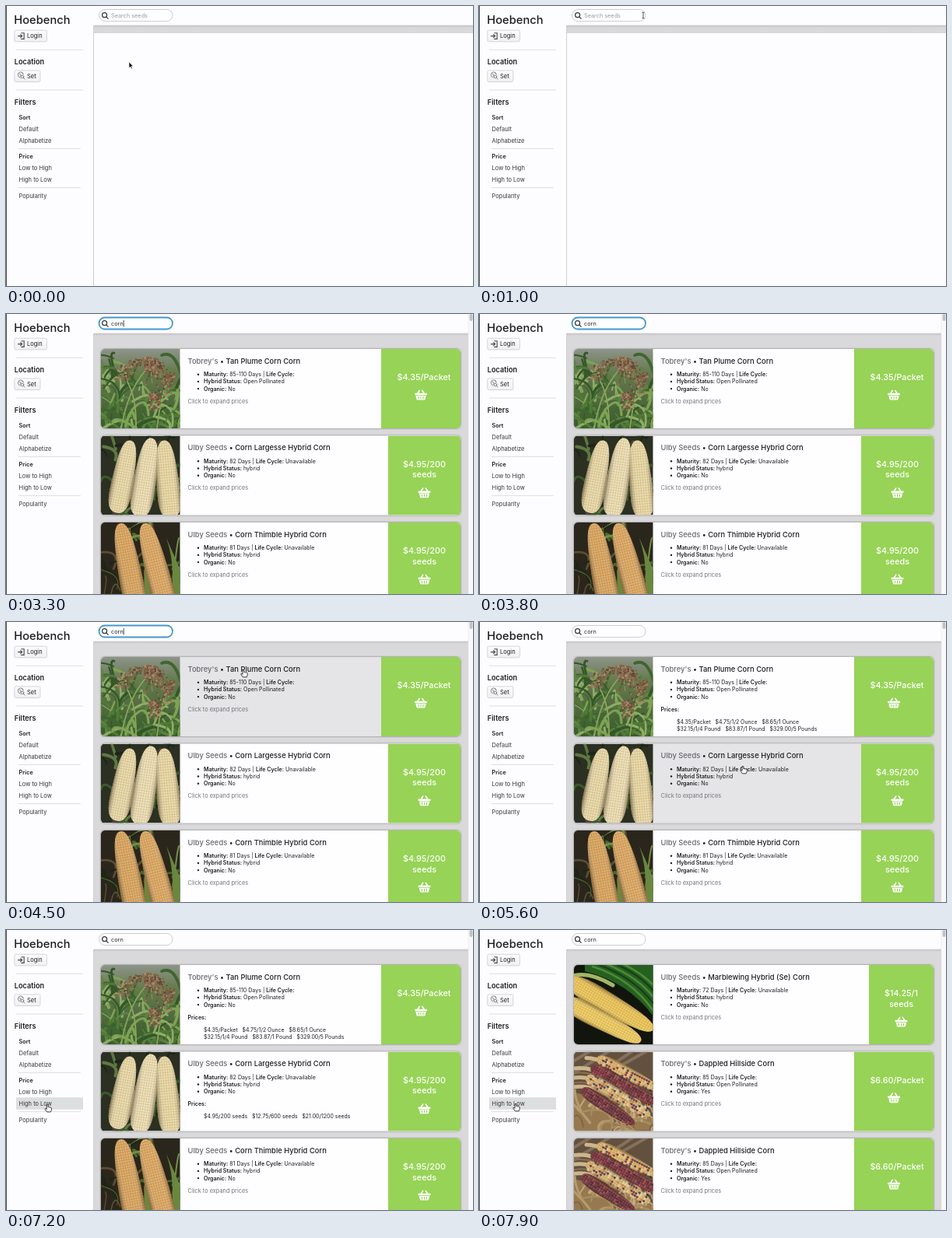
An HTML page for the animation above (8000 ms loop, 600 by 360 pixels).

```html
<!DOCTYPE html>
<html lang="en">
<head>
<meta charset="utf-8">
<title>Seed search</title>
<style>
html, body { margin: 0; width: 100%; height: 100%; overflow: hidden; background: #fdfcfe; }
svg { display: block; }
text { font-family: Inter, "Open Sans", sans-serif; fill: #1d1d20; white-space: pre; }
.b { font-weight: 600; }
.m { font-weight: 500; }
</style>
</head>
<body>
<svg id="stage" width="600" height="360" viewBox="0 0 600 360">
  <defs>
    <clipPath id="cardClip"><rect width="462" height="102" rx="5"/></clipPath>
    <pattern id="kernels" width="3.4" height="3.1" patternUnits="userSpaceOnUse">
      <path d="M0 0H3.4M0 0V3.1" stroke="#6b4310" stroke-opacity=".3" stroke-width=".8"/>
      <circle cx="1.9" cy="1.7" r=".8" fill="#fff" fill-opacity=".25"/>
    </pattern>
    <linearGradient id="round" x2="0" y2="1">
      <stop offset="0" stop-color="#2a1800" stop-opacity=".45"/>
      <stop offset=".25" stop-color="#fff" stop-opacity=".1"/>
      <stop offset=".7" stop-color="#fff" stop-opacity=".08"/>
      <stop offset="1" stop-color="#2a1800" stop-opacity=".5"/>
    </linearGradient>
    <linearGradient id="button" x2="0" y2="1">
      <stop offset="0" stop-color="#fdfcfe"/><stop offset="1" stop-color="#f0f0f2"/>
    </linearGradient>
    <linearGradient id="shade" x2="0" y2="1">
      <stop offset="0" stop-color="#000" stop-opacity=".1"/><stop offset="1" stop-color="#000" stop-opacity="0"/>
    </linearGradient>
    <linearGradient id="field" x2="0" y2="1">
      <stop offset="0" stop-color="#8d9488"/><stop offset=".3" stop-color="#66794f"/><stop offset="1" stop-color="#3a5a2c"/>
    </linearGradient>
  </defs>
  <rect width="600" height="360" fill="#fdfcfe"/>
  <rect id="bar" x="112" y="25" width="488" height="10" fill="#d9d8da"/>
  <g id="results"></g>
  <rect x="113" y="25" width="487" height="3" fill="url(#shade)"/>
  <path d="M113 25H600" stroke="#cccbce" stroke-width=".7"/>
  <g id="scroll">
    <rect x="594" width="6" height="360" fill="#f9f8fa"/>
    <path d="M594 0V360" stroke="#e6e5e7" stroke-width=".6"/>
    <rect x="595.5" y="0" width="4" height="9" rx="2" fill="#c2c1c3"/>
  </g>
  <g id="sidebar"></g>
  <g id="search">
    <rect id="box" x="119.5" y="4.5" width="94.5" height="15" rx="7.5" fill="#fefdff"/>
    <g fill="none" stroke="#34343a" stroke-width="1.2" stroke-linecap="round">
      <circle cx="126.6" cy="11.7" r="3"/><path d="M129 14.1l2.2 2.2"/>
    </g>
    <text id="query" x="135" y="14.8" font-size="7.3"></text>
    <path id="caret" stroke="#222" stroke-width=".8"/>
  </g>
  <g id="pointer">
    <path id="arrow" d="M0 0V7.6L1.8 6L3 8.7L4.2 8.2L3 5.5H5.4Z" fill="#111" stroke="#fff" stroke-width=".5"/>
    <path id="beam" d="M-1.5 -4Q0 -4 0 -3V3Q0 4 -1.5 4M1.5 -4Q0 -4 0 -3M0 3Q0 4 1.5 4" fill="none" stroke="#222" stroke-width=".8"/>
    <path id="hand" d="M-.9 .8Q0 -.6 .9 .8V3.6Q1.9 3 2.5 3.9Q3.4 3.4 4 4.3Q5.2 4 5.2 5.3V7.2L4.3 9.8H-.6L-3.2 6.2Q-3.2 4.9 -2 5.4L-.9 6.3Z" fill="#fff" stroke="#111" stroke-width=".8" stroke-linejoin="round"/>
  </g>
</svg>
<script>
const $ = id => document.getElementById(id);
const show = (el, on) => el.setAttribute('visibility', on ? 'inherit' : 'hidden');
const text = (x, y, size, str, attrs = '') => `<text x="${x}" y="${y}" font-size="${size}" ${attrs}>${str}</text>`;
const line = (d, stroke, width) => `<path d="${d}" fill="none" stroke="${stroke}" stroke-width="${width}" stroke-linecap="round"/>`;

function seeded(seed) {
  return (a = 0, b = 1) => {
    seed = (seed * 16807) % 2147483647;
    return a + (b - a) * seed / 2147483647;
  };
}

// Pictures, each about 102 by 102
function blades(seed, count, colors, top = 10) {
  const r = seeded(seed);
  let out = '';
  for (let i = 0; i < count; i++) {
    const x = r(-10, 110), y = r(top, 115);
    out += line(`M${x} ${y}q${r(-12, 12)} ${r(-35, -10)} ${r(-38, 38)} ${r(-30, 12)}`,
      colors[i % colors.length], r(1, 4));
  }
  return out;
}

// A cob runs from its narrow tip to its base
function cob(x1, y1, x2, y2, w, color, specks) {
  const len = Math.hypot(x2 - x1, y2 - y1), turn = Math.atan2(y2 - y1, x2 - x1) * 180 / Math.PI;
  const half = s => `C0 ${-.36 * w * s} ${len * .2} ${-.44 * w * s} ${len / 2} ${-w / 2 * s}S${len} ${-.55 * w * s} ${len} 0`;
  const shape = fill => `<path d="M0 0${half(1)}L0 0${half(-1)}Z" fill="${fill}"/>`;
  let dots = '';
  if (specks) {
    const r = seeded(Math.round(x1 * 7 + y1 * 31 + 900));
    for (let x = 8; x < len - 6; x += 3.4)
      for (let y = -w * .36; y < w * .38; y += 3.1)
        if (r() < .55) dots += `<circle cx="${x}" cy="${y}" r="1.6" fill="${specks[Math.floor(r(0, specks.length))]}"/>`;
  }
  return `<g transform="translate(${x1} ${y1}) rotate(${turn})">` +
    shape(color) + dots + shape('url(#kernels)') + shape('url(#round)') + '</g>';
}

function plume(x, y, dx, dy, seed) {
  const r = seeded(seed), tones = ['#7d5640', '#97705a', '#644636', '#a98b6c', '#72693f'];
  let out = line(`M${x} ${y}q${dx / 2} ${-6} ${dx} ${dy}`, '#8b9b58', 1);
  for (let i = 0; i < 130; i++) {
    const k = r(), spread = 3 + 6 * k;
    out += `<circle cx="${x + dx * k + r(-spread, spread)}" cy="${y + dy * k * k - 4 * k + r(-spread, spread)}" r="${r(.7, 1.6)}" fill="${tones[i % 5]}"/>`;
  }
  return out;
}

const greens = ['#4f7a35', '#7ea353', '#335728', '#8fac68', '#3f6630', '#5c8342'];
const straw = ['#a88d62', '#c4aa7c', '#7c6444', '#b59a6d'];
const back = fill => `<rect width="102" height="102" fill="${fill}"/>`;
const pictures = {
  broom: () => back('url(#field)') + blades(41, 90, greens, 26) +
    line('M26 102Q34 55 56 29M72 102Q76 66 84 44M45 102Q46 64 34 42', '#88a65b', 1.8) +
    plume(62, 16, -38, 24, 7) + plume(58, 14, 8, 30, 19) + plume(66, 16, 12, 26, 47) +
    plume(92, 34, -10, 26, 33) + plume(64, 60, 8, 16, 71),
  pale: () => back('#2b3022') + blades(12, 32, ['#3c5a2a', '#1c2717', '#51443a', '#5d7940']) +
    cob(38, 6, 20, 99, 27, '#e6d5a0') + cob(65, 3, 49, 104, 28, '#eadbac') + cob(81, 6, 90, 106, 28, '#e6d49c'),
  gold: () => back('#2a261b') + blades(77, 34, ['#496a2d', '#202417', '#5c4c34', '#708e43']) +
    '<path d="M57 112Q52 55 62 25Q76 70 76 112ZM88 112Q98 60 84 20L106 70V112Z" fill="#6a8740"/>' +
    cob(25, 1, 47, 116, 29, '#d59c50') + cob(56, 1, 86, 116, 29, '#d89f54'),
  yellow: () => back('#12150d') +
    '<path d="M14 0H102V66Q70 22 14 8Z" fill="#256021"/>' +
    line('M24 2Q75 18 104 62M40 -2Q84 16 104 44M62 -2Q90 12 104 28', '#4d8a35', 2.5) +
    line('M30 -1Q78 16 104 52M52 -2Q88 14 104 36', '#153d16', 2) +
    line('M-2 14Q20 8 50 26', '#a3b565', 5) +
    cob(102, 83, -6, 20, 26, '#eac048') + cob(86, 98, -12, 46, 24, '#ecc651'),
  mixed: () => back('#62513f') +
    line('M-4 30L50 -4M-4 14L26 -4M20 36L80 -4M60 18L106 -8', '#84705b', 4) +
    '<path d="M0 52Q30 60 102 84V102H0Z" fill="#96794f"/>' + blades(65, 48, straw, 68) +
    line('M-4 22Q18 18 40 30M-4 34Q16 30 34 40M-4 46Q14 42 30 50M16 8Q28 8 44 16', '#cdb68c', 5) +
    line('M-4 28Q18 24 40 35M-4 41Q16 36 34 46', '#8a7050', 2) +
    cob(108, 48, 30, 8, 16, '#d6ab58', ['#7b2632', '#463047', '#e3c881']) +
    cob(106, 66, 22, 20, 17, '#5f1a24', ['#7d2530', '#401522', '#8f3a3c']) +
    cob(98, 82, 16, 32, 17, '#d0ad66', ['#6c2637', '#3f3347', '#c37b3c', '#e7d3a1']) +
    cob(78, 93, 10, 48, 16, '#621c26', ['#4d192c', '#8c3639', '#35141f'])
};

// Cards
function basket(cx, cy) {
  return `<g transform="translate(${cx} ${cy})">` +
    line('M-4.8 -1L-1.8 -5.6M4.8 -1L1.8 -5.6', '#fff', 1.6) +
    '<rect x="-8" y="-2.2" width="16" height="2.5" rx="1" fill="#fff"/>' +
    '<path d="M-6.7 1H6.7L5.5 5.8Q5.3 6.6 4.4 6.6H-4.4Q-5.3 6.6 -5.5 5.8Z" fill="#fff"/>' +
    line('M-3 2.4V5M0 2.4V5M3 2.4V5', '#97d356', 1.1) + '</g>';
}

function card(y, c) {
  const label = (name, value) => `<tspan class="b">${name}:</tspan> ${value}`;
  const facts = [
    label('Maturity', `${c.days} Days | `) + label('Life Cycle', c.cycle || ''),
    label('Hybrid Status', c.status),
    label('Organic', c.organic || 'No')
  ];
  const twoLines = c.price.length > 1;
  const mid = twoLines ? (c.edge + 462) / 2 : 415;
  const prices = (c.list || []).map((row, i) => text(132, 85.7 + i * 9.3, 6.95, row.join('\u00a0\u00a0\u00a0')));
  return `<g transform="translate(122 ${y})">
    <rect width="462" height="102" rx="5" fill="#fff" style="filter:drop-shadow(0 .7px 1.3px rgba(0,0,0,.5))"/>
    <g clip-path="url(#cardClip)">
      <rect class="face" width="462" height="102" fill="#fefdff"/>
      <svg width="101.5" height="102">${pictures[c.picture]()}</svg>
      <rect x="${c.edge}" width="${462 - c.edge}" height="102" fill="#97d356"/>
    </g>` +
    text(111.5, 18.8, 9.4, `<tspan fill="#68676c">${c.brand}</tspan> • ${c.name}`, 'class="m"') +
    facts.map((f, i) => `<circle cx="125" cy="${32.7 + i * 9.2}" r="1.2" fill="#1d1d20"/>` + text(132, 35.2 + i * 9.2, 7.08, f)).join('') +
    text(111.5, 69.7, 7.4, 'Click to expand prices', 'class="closed" style="fill:#77767b"') +
    `<g class="open">${text(111.5, 69.7, 7.1, 'Prices:', 'class="b"')}${prices.join('')}</g>` +
    c.price.map((p, i) => text(mid, 40 + i * 13.8, 10.8, p, 'class="m" text-anchor="middle" style="fill:#fff"')).join('') +
    basket((c.edge + 462) / 2, twoLines ? 73 : 59) + '</g>';
}

const tops = [45, 156.6, 268];
const hybrid = { brand: 'Ulby Seeds', status: 'hybrid', cycle: 'Unavailable', edge: 369, price: ['$4.95/200', 'seeds'] };
const open = { brand: "Tobrey's", status: 'Open Pollinated', edge: 360 };
const dappled = { ...open, name: 'Dappled Hillside Corn', days: 85, organic: 'Yes', picture: 'mixed', price: ['$6.60/Packet'] };
const found = [
  { ...open, name: 'Tan Plume Corn Corn', days: '85-110', picture: 'broom', price: ['$4.35/Packet'],
    list: [['$4.35/Packet', '$4.75/1/2 Ounce', '$8.65/1 Ounce'], ['$32.15/1/4 Pound', '$83.87/1 Pound', '$329.00/5 Pounds']] },
  { ...hybrid, name: 'Corn Largesse Hybrid Corn', days: 82, picture: 'pale',
    list: [['$4.95/200 seeds', '$12.75/600 seeds', '$21.00/1200 seeds']] },
  { ...hybrid, name: 'Corn Thimble Hybrid Corn', days: 81, picture: 'gold' }
];
const sorted = [
  { ...hybrid, name: 'Marblewing Hybrid (Se) Corn', days: 72, picture: 'yellow', edge: 379, price: ['$14.25/1', 'seeds'] },
  dappled, dappled
];
const group = (id, cards) => `<g id="${id}">${cards.map((c, i) => card(tops[i], c)).join('')}</g>`;
$('results').innerHTML = '<rect x="112" y="25" width="482" height="335" fill="#d9d8da"/>' +
  group('found', found) + group('sorted', sorted);

// Sidebar
const button = (y, w) => `<rect x="10.9" y="${y}" width="${w}" height="14.6" rx="1.6" fill="url(#button)" stroke="#cbcacf" stroke-width=".8"/>`;
const rows = [['Sort', 146, 1], ['Default', 160.8], ['Alphabetize', 176], ['Price', 195.8, 1],
  ['Low to High', 210.7], ['High to Low', 225.8], ['Popularity', 246.6]];
$('sidebar').innerHTML =
  '<rect width="112" height="360" fill="#fdfcfe"/>' +
  '<rect x="112" y="25" width="1" height="335" fill="#cfced1"/>' +
  '<rect width="1" height="360" fill="#4c4b4f"/>' +
  '<rect id="rowHover" x="13" y="215.3" width="86" height="15.5" rx="1.2" fill="#dddee0"/>' +
  text(10.3, 23, 14.7, 'Hoebench', 'class="m"') +
  button(31.2, 41.5) + text(27, 41.2, 7.5, 'Login') +
  line('M19.8 34.8H23.2V42.4H19.8M15.5 38.6H20.5M18.7 36.6L20.7 38.6L18.7 40.6', '#46464b', 1.1) +
  text(10.8, 75.2, 9.2, 'Location', 'class="b"') +
  button(82.9, 33) + text(27, 92.9, 7.5, 'Set') +
  '<g fill="none" stroke="#6b6b70" stroke-width=".8" stroke-linecap="round"><path d="M22.5 88A3.6 3.6 0 1 0 18 92M17 87.2l2.2 1.2l-.6 1.8M20.4 86l1.2 1.2"/><circle cx="21" cy="91" r="1.8"/><path d="M22.4 92.4L24 94"/></g>' +
  text(10.8, 127.2, 9.2, 'Filters', 'class="b"') +
  rows.map(([s, y, head]) => text(16.6, y, head ? 7.3 : 7.5, s, head ? 'class="b"' : 'style="fill:#37373b"')).join('') +
  line('M13.5 56.3H98.5M13.5 108H98.5M16 183.4H95.5M16 233.6H95.5', '#d9d8dc', .8);

// Timeline, in ms
const typing = [[2200, 'c'], [2400, 'co'], [2600, 'cor'], [2800, 'corn']];
const time = { focus: 1200, results: 3000, blur: 4900, open: [4900, 5900], sort: 7600 };
const path = [[0, 158, 72], [400, 158, 72], [1000, 211, 12], [3800, 211, 12], [4400, 305, 61], [5000, 305, 61],
  [5500, 339, 185], [5900, 339, 185], [6500, 159, 243], [6600, 159, 243], [7300, 47, 223], [8000, 47, 223]];
const carets = [[1200, 1700], [2200, 3500], [4000, 4600]];

function pointerAt(t) {
  const i = path.findIndex(p => p[0] > t);
  const [t0, x0, y0] = path[i - 1], [t1, x1, y1] = path[i];
  const k = (t - t0) / (t1 - t0), e = k * k * (3 - 2 * k);
  return [x0 + (x1 - x0) * e, y0 + (y1 - y0) * e];
}

function render(t) {
  const focused = t >= time.focus && t < time.blur;
  const hasResults = t >= time.results, isSorted = t >= time.sort;
  const [x, y] = pointerAt(t);

  show($('results'), hasResults);
  show($('bar'), !hasResults);
  show($('scroll'), hasResults);
  show($('found'), hasResults && !isSorted);
  show($('sorted'), isSorted);

  const overCard = hasResults && x > 122 && x < 584 ? tops.findIndex(top => y >= top && y < top + 102) : -1;
  for (const id of ['found', 'sorted'])
    [...$(id).children].forEach((el, i) => {
      const expanded = id === 'found' && t >= time.open[i];
      el.querySelector('.face').setAttribute('fill', i === overCard ? '#e5e4e7' : '#fefdff');
      show(el.querySelector('.open'), expanded);
      show(el.querySelector('.closed'), !expanded);
    });

  const overRow = x > 13 && x < 99 && y > 215 && y < 231;
  show($('rowHover'), overRow);

  const typed = typing.reduce((s, [at, str]) => t >= at ? str : s, '');
  const query = $('query');
  query.textContent = typed || 'Search seeds';
  query.style.fill = typed ? '#2b2b30' : '#9b9aa0';
  $('box').setAttribute('stroke', focused ? '#4599cb' : '#c8c7cc');
  $('box').setAttribute('stroke-width', focused ? 1.8 : .9);
  const end = 135.5 + (typed ? query.getComputedTextLength() : 0);
  $('caret').setAttribute('d', `M${end} 8V16.5`);
  show($('caret'), carets.some(([a, b]) => t >= a && t < b));

  const inBox = x > 119 && x < 214 && y > 4 && y < 20;
  const kind = inBox ? 'beam' : overRow || overCard >= 0 ? 'hand' : 'arrow';
  $('pointer').setAttribute('transform', `translate(${x} ${y})`);
  show($('pointer'), t < 2200 || t >= 3900);
  for (const id of ['arrow', 'beam', 'hand']) show($(id), id === kind);
}

const start = performance.now();
function tick() {
  const t = Math.max(0, performance.now() - start) % 8000;
  render(Math.floor(t / 100) * 100);
  requestAnimationFrame(tick);
}
tick();
</script>
</body>
</html>
```
